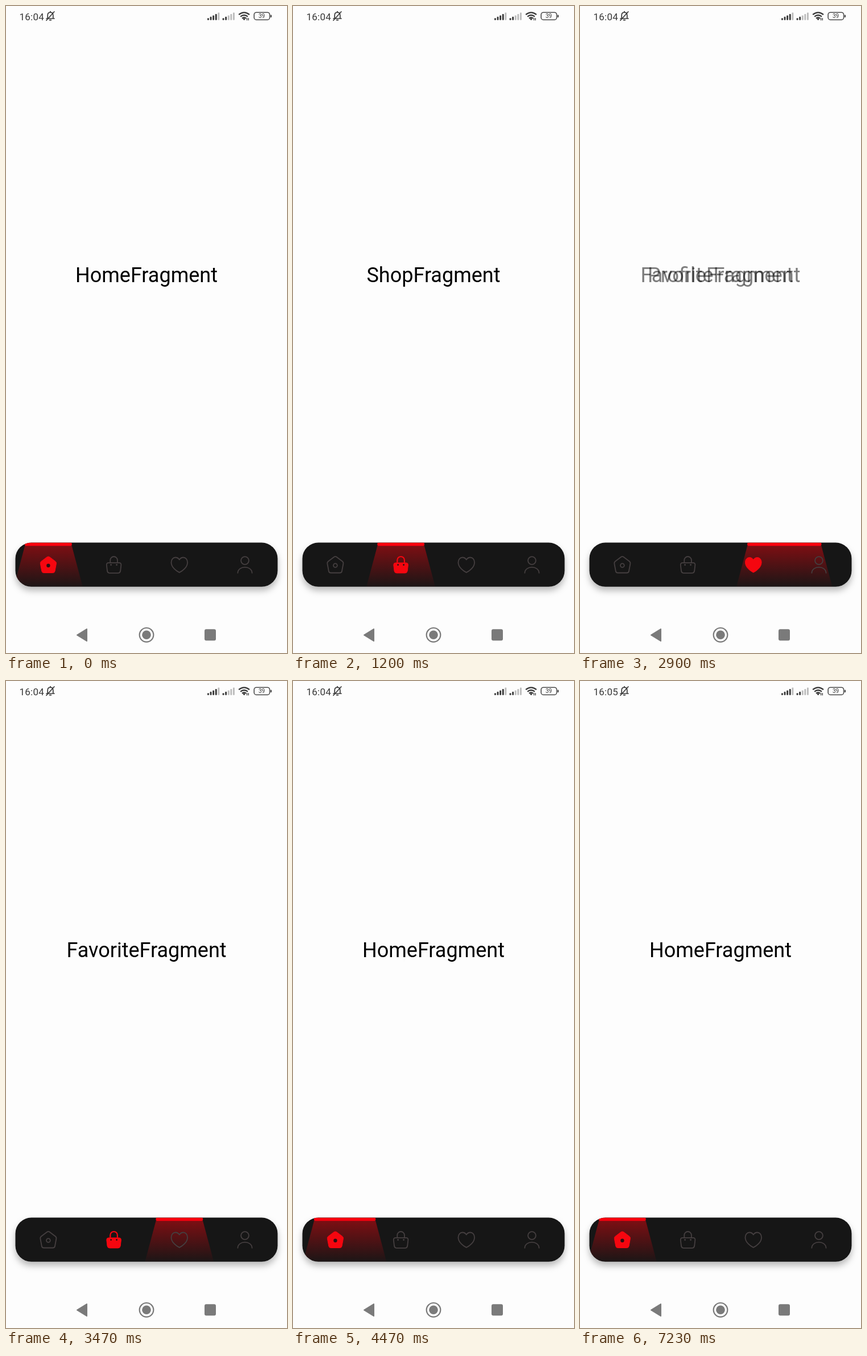
Write an HTML page that moves like this. It is 494 px wide and 1134 px high and loops after 7.26 s.

```html
<!DOCTYPE html>
<html lang="en">
<head>
<meta charset="utf-8">
<title>Bottom navigation</title>
<style>
  html, body { margin: 0; width: 100%; height: 100%; overflow: hidden; background: #fdfdfd; }
  svg { display: block; width: 100vw; height: 100vh; }
  text { font-family: Roboto, sans-serif; }
  .title { font-size: 36px; text-anchor: middle; fill: #000; }
  .line { fill: none; stroke: #453f40; stroke-width: 1.8; stroke-linecap: round; stroke-linejoin: round; }
  .dot { fill: #453f40; stroke: none; }
  .solid { fill: #f5060f; stroke: #f5060f; stroke-width: 1; stroke-linejoin: round; }
  .hole { fill: #2a1013; stroke: none; }
</style>
</head>
<body>
<svg viewBox="0 0 494 1134" xmlns="http://www.w3.org/2000/svg">
  <defs>
    <clipPath id="barClip"><rect x="16.5" y="940.5" width="461" height="77.3" rx="28"/></clipPath>
    <linearGradient id="beamFill" gradientUnits="userSpaceOnUse" x1="0" y1="944" x2="0" y2="1017">
      <stop offset="0" stop-color="#f5060f" stop-opacity=".47"/>
      <stop offset="1" stop-color="#f5060f" stop-opacity=".03"/>
    </linearGradient>
    <filter id="shadow" x="-10%" y="-30%" width="120%" height="190%">
      <feDropShadow dx="0" dy="7" stdDeviation="6" flood-color="#000" flood-opacity=".27"/>
    </filter>
  </defs>
  <rect width="494" height="1134" fill="#fdfdfd"/>

  <!-- status bar -->
  <g fill="#383838">
    <text id="clock" x="23.6" y="24.8" font-size="17" letter-spacing=".2"></text>
    <g fill="none" stroke="#383838" stroke-width="1.7" stroke-linecap="round" stroke-linejoin="round">
      <path d="M71 22H85M73.2 21.5V16.5C73.2 13 75 11.2 78 11.2S82.8 13 82.8 16.5V21.5M78 9.6V11M76.6 24.6H79.4"/>
      <path d="M71 25.3L84.8 10"/>
    </g>
    <g id="signals"></g>
    <g fill="none" stroke="#383838" stroke-width="2.3">
      <path d="M409.2 15.2Q418.6 7.6 428 15.2M412.2 18.6Q418.6 13.4 425 18.6M415 21.6Q418.6 18.8 422.2 21.6"/>
    </g>
    <path d="M416.2 22.6Q418.6 21 421 22.6L418.6 25.2Z"/>
    <path d="M423.6 21V25.2M426.3 21V25.2" stroke="#383838" stroke-width="1.3"/>
    <rect x="436.2" y="11.2" width="27.4" height="13" rx="4" fill="none" stroke="#4a4a4a" stroke-width="1.6"/>
    <rect x="465" y="15.4" width="1.9" height="4.6" rx=".8"/>
    <text x="449.5" y="21.4" font-size="10" text-anchor="middle">39</text>
  </g>

  <g id="titles"></g>

  <rect x="16.5" y="940.5" width="461" height="77.3" rx="28" fill="#131313" filter="url(#shadow)"/>
  <g clip-path="url(#barClip)">
    <path id="beam" fill="url(#beamFill)"/>
    <rect id="strip" y="940.4" height="5.8" rx="2.4" fill="#f8000e"/>
  </g>
  <g id="icons"></g>

  <!-- system navigation -->
  <g fill="#7a7a7a">
    <path d="M125 1102.5L142 1092V1113Z" stroke="#7a7a7a" stroke-width="2" stroke-linejoin="round"/>
    <circle cx="247" cy="1102.3" r="12.3" fill="none" stroke="#7a7a7a" stroke-width="2.2"/>
    <circle cx="247" cy="1102.3" r="7.8"/>
    <rect x="349" y="1092.3" width="20" height="20" rx="3"/>
  </g>
</svg>
<script>
const LOOP = 7260;
const SLIDE = 300, SLIDE_DELAY = 33;
const FADE = 125, FADE_DELAY = 78;
const CLOCK_TICK = 6100;
const HALF_STRIP = 41.4, FLARE = 19;
const names = ["Home", "Shop", "Favorite", "Profile"];
const [HOME, SHOP, FAV, PROFILE] = [0, 1, 2, 3];

// [time, selected tab]
const taps = [
  [-1000, HOME], [790, SHOP], [1430, FAV], [2069, PROFILE], [2760, FAV],
  [3455, SHOP], [4272, HOME], [5050, FAV], [5760, PROFILE], [6490, HOME]
];

// Icon shapes are centred on (0, 0) at the middle of each tab.
const bag = "M-9.3 -3.6H9.3Q12.9 -3.6 12.8 0L11.6 10.5Q11 14.4 7.3 14.4H-7.3Q-11 14.4 -11.6 10.5L-12.8 0Q-12.9 -3.6 -9.3 -3.6Z";
const handle = "M-6.3 -3.8V-8.2A6.3 6.3 0 0 1 6.3 -8.2V-3.8";
const house = "M-2.3 -13.8Q0 -15.3 2.3 -13.8L12.6 -6Q14.6 -4.4 14 -2L11.6 11Q11 14 8 14H-8Q-11 14 -11.6 11L-14 -2Q-14.6 -4.4 -12.6 -6Z";
const heart = "M0 13.4C-5 11 -14.3 4.5 -14.3 -4.3C-14.3 -9.8 -10.8 -13 -7 -13C-3.8 -13 -1.5 -11.4 0 -9C1.5 -11.4 3.8 -13 7 -13C10.8 -13 14.3 -9.8 14.3 -4.3C14.3 4.5 5 11 0 13.4Z";
const eyes = cls => `<circle class="${cls}" cx="-5" cy="0" r="1.4"/><circle class="${cls}" cx="5" cy="0" r="1.4"/>`;
const shape = (d, cls) => `<path class="${cls}" d="${d}"/>`;

const outlines = [
  shape(house, "line") + '<circle class="line" cy="1" r="3.4"/>',
  shape(bag, "line") + shape(handle, "line") + eyes("dot"),
  shape(heart, "line"),
  '<circle class="line" cy="-7.5" r="6.9"/>' + shape("M-12.6 14.2C-12 0.7 12 0.7 12.6 14.2", "line")
];
const solids = [
  shape(house, "solid") + '<circle class="hole" cy="1.2" r="3.2"/>',
  shape(bag, "solid") + `<path d="${handle}" fill="none" stroke="#f5060f" stroke-width="2.2"/>` + eyes("hole"),
  shape(heart, "solid"),
  '<circle class="solid" cy="-7.5" r="6.6"/>' + shape("M-12 11.8C-10.5 1 10.5 1 12 11.8Q12.2 14 10 14H-10Q-12.2 14 -12 11.8Z", "solid")
];

const $ = id => document.getElementById(id);
const center = i => 16.8 + 115.2 * (i + 0.5);
const clamp = x => Math.min(1, Math.max(0, x));
const mix = (a, b, p) => a + (b - a) * p;

$("titles").innerHTML = names.map(n => `<text class="title" x="247" y="484">${n}Fragment</text>`).join("");
$("icons").innerHTML = names.map((n, i) =>
  `<g transform="translate(${center(i)} 979.5)"><g>${outlines[i]}</g><g>${solids[i]}</g></g>`).join("");

const signal = (x, strong) => [0, 1, 2, 3, 4].map(i => {
  const h = 3.6 + i * 2.4;
  return `<rect x="${x + i * 4.6}" y="${24.8 - h}" width="2.9" height="${h}" rx="1" fill="${i < strong ? "#383838" : "#bcbcbc"}"/>`;
}).join("");
$("signals").innerHTML = signal(354, 4) + signal(380.6, 2);

const titles = [...$("titles").children];
const icons = [...$("icons").children];

// cubic-bezier(.4, 0, .2, 1), solved for x by bisection
function fastOutSlowIn(x) {
  let lo = 0, hi = 1;
  for (let i = 0; i < 24; i++) {
    const s = (lo + hi) / 2, r = 1 - s;
    if (1.2 * r * r * s + 0.6 * r * s * s + s * s * s < x) lo = s; else hi = s;
  }
  return lo * lo * (3 - 2 * lo);
}

function drawIndicator(from, to, progress) {
  const angle = fastOutSlowIn(progress) * Math.PI / 2;
  const lead = Math.sin(angle), trail = 1 - Math.cos(angle);
  const right = to > from;
  const a = mix(center(from), center(to), right ? trail : lead) - HALF_STRIP;
  const b = mix(center(from), center(to), right ? lead : trail) + HALF_STRIP;
  $("strip").setAttribute("x", a);
  $("strip").setAttribute("width", b - a);
  $("beam").setAttribute("d", `M${a + 1} 943H${b - 1}L${b + FLARE} 1017.8H${a - FLARE}Z`);
}

function draw(t) {
  const n = taps.findLastIndex(tap => tap[0] <= t);
  const [time, tab] = taps[n];
  const prev = n ? taps[n - 1][1] : tab;
  const since = t - time;

  drawIndicator(prev, tab, clamp((since - SLIDE_DELAY) / SLIDE));

  const fade = (1 - Math.cos(Math.PI * clamp((since - FADE_DELAY) / FADE))) / 2;
  titles.forEach((el, i) => {
    el.setAttribute("opacity", i === tab ? (prev === tab ? 1 : fade) : i === prev ? 1 - fade : 0);
  });
  icons.forEach((el, i) => {
    el.children[0].style.display = i === tab ? "none" : "";
    el.children[1].style.display = i === tab ? "" : "none";
  });
  $("clock").textContent = t < CLOCK_TICK ? "16:04" : "16:05";
}

function frame() {
  draw(performance.now() % LOOP);
  requestAnimationFrame(frame);
}
frame();
</script>
</body>
</html>
```
